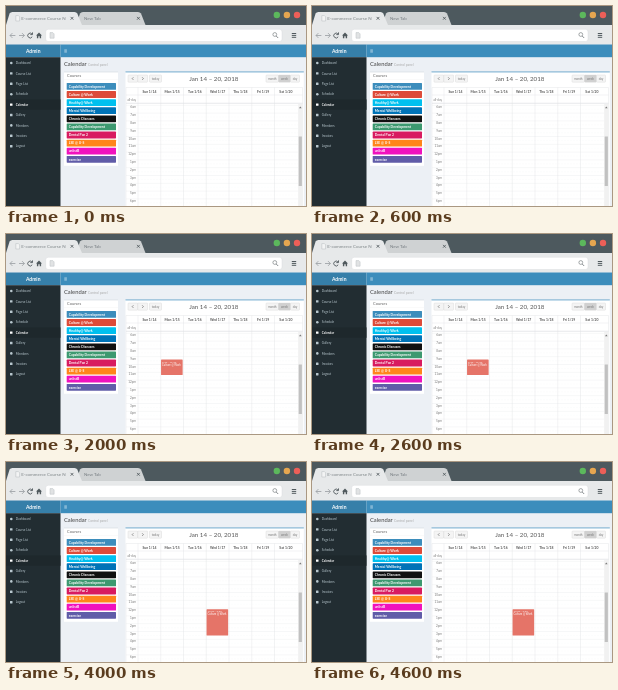
Animation, 300 px wide and 200 px high, one loop 5000 ms. Source, as an HTML page:

```html
<!DOCTYPE html>
<html lang="en">
<head>
<meta charset="utf-8">
<title>Course calendar</title>
<style>
html, body { margin: 0; width: 100%; height: 100%; overflow: hidden; background: #ecf0f5; }
svg { display: block; width: 100vw; height: 100vh; font-family: Lato, "Open Sans", sans-serif; }
</style>
</head>
<body>
<svg id="stage" viewBox="0 0 300 200"></svg>
<script>
const NS = 'http://www.w3.org/2000/svg';
const stage = document.getElementById('stage');

function add(parent, tag, attrs) {
  const node = document.createElementNS(NS, tag);
  for (const key in attrs) node.setAttribute(key, attrs[key]);
  parent.appendChild(node);
  return node;
}
const group = () => add(stage, 'g', {});
const rect = (g, x, y, width, height, fill, more) =>
  add(g, 'rect', { x, y, width, height, fill, ...more });
const path = (g, d, stroke, width = 0.6, fill = 'none') =>
  add(g, 'path', { d, stroke, 'stroke-width': width, fill });
const circle = (g, cx, cy, r, fill, more) => add(g, 'circle', { cx, cy, r, fill, ...more });
function text(g, str, x, y, size, fill, more) {
  add(g, 'text', { x, y, 'font-size': size, fill, ...more }).textContent = str;
}
const bold = { 'font-weight': 700 };
const mid = { 'text-anchor': 'middle' };
const end = { 'text-anchor': 'end' };

function drawBrowser(g) {
  rect(g, 0, 0, 300, 20, '#4d595e');
  path(g, 'M70 19L74 7.5Q74.7 6 77 6H132Q134 6 135 7.5L139.5 19Z', 'none', 0, '#cfd2d3');
  path(g, 'M0 19L3.6 7.5Q4.3 6 6.5 6H68.5Q70.5 6 71.3 7.5L76 19Z', 'none', 0, '#e7e9ea');
  path(g, 'M9.8 9.6h2.6l1.2 1.2v4.2H9.8Z', '#b5babc', 0.5, '#f3f4f4');
  text(g, 'E-commerce Course N', 15.2, 14, 4.5, '#7d8487');
  path(g, 'M64.6 10.9l2.8 2.8m0 -2.8l-2.8 2.8M131 10.9l2.8 2.8m0 -2.8l-2.8 2.8', '#4a5256', 0.8);
  text(g, 'New Tab', 78, 14, 4.4, '#757c80');
  ['#5cb85c', '#e6a650', '#ec5f58'].forEach((c, i) => circle(g, 270.8 + i * 10.1, 9, 3.2, c));

  rect(g, 0, 19, 300, 19.5, '#e7e9ea');
  path(g, 'M9.4 29.5H4m2.4 -2.4L4 29.5l2.4 2.4M13 29.5h5.4m-2.4 -2.4l2.4 2.4l-2.4 2.4', '#989ea1', 0.8);
  path(g, 'M26 28A2.4 2.4 0 1 0 26.2 30.8M26.5 26.4v2.2h-2.2', '#50595d', 0.9);
  path(g, 'M30 29.6L33 26.6L36 29.6H35.1V32.2H33.7V30.3H32.3V32.2H30.9V29.6Z', 'none', 0, '#50595d');
  rect(g, 39.7, 23.3, 236.3, 12.2, '#fff', { rx: 2.5, stroke: '#d3d6d8', 'stroke-width': 0.4 });
  path(g, 'M44 26.6h2.8l1.3 1.3v4.3H44Z', '#b9bec0', 0.5, '#e1e3e4');
  circle(g, 268.8, 28.5, 1.9, 'none', { stroke: '#7b8285', 'stroke-width': 0.7 });
  path(g, 'M270.2 30l2 2', '#7b8285', 0.9);
  path(g, 'M285.8 27.5h4.4m-4.4 1.9h4.4m-4.4 1.9h4.4', '#50595d', 1);
}

function drawSidebar(g) {
  rect(g, 0, 38.5, 54.5, 12.7, '#367fa9');
  rect(g, 54.5, 38.5, 245.5, 12.7, '#3c8dbc');
  text(g, 'Admin', 27.2, 46.8, 5, '#fff', { ...bold, ...mid });
  path(g, 'M58.3 43.9h2.6m-2.6 1.1h2.6m-2.6 1.1h2.6', '#e8f1f7', 0.5);
  rect(g, 0, 51.2, 54.5, 149, '#222d32');
  const items = ['Dashboard', 'Course List', 'Page List', 'Schedule', 'Calendar',
    'Gallery', 'Members', 'Invoices', 'Logout'];
  items.forEach((label, i) => {
    const y = 57 + i * 10.4, on = i === 4, ink = on ? '#fff' : '#b8c7ce';
    if (on) rect(g, 0, y - 5.2, 54.5, 10.4, '#1e282c');
    if (i % 3 === 0) circle(g, 5.3, y, 1.3, ink);
    else rect(g, 4, y - 1.2, 2.5, 2.4, ink, { rx: 0.3 });
    text(g, label, 9.8, y + 1.1, 3.1, ink, on ? bold : {});
  });
}

const courses = [
  ['Capability Development', '#3c8dbc'], ['Culture @ Work', '#dd4b39'],
  ['Healthy@ Work', '#00c0ef'], ['Mental Wellbeing', '#0073b7'],
  ['Chronic Diseases', '#111'], ['Capability Development', '#3d9970'],
  ['Dental Pan 2', '#d81b60'], ['LSE @ U-S', '#ff851b'],
  ['unlistB', '#f012be'], ['exercise', '#605ca8']
];
let dragged;

function drawCourses(g) {
  text(g, 'Calendar', 58, 60.2, 5.8, '#444');
  text(g, 'Control panel', 82, 60, 3.3, '#aaa');
  rect(g, 58, 66, 54, 93.8, '#fff');
  rect(g, 58, 65.7, 54, 0.6, '#d2d6de');
  text(g, 'Courses', 61, 71.3, 4, '#666');
  rect(g, 58, 73.6, 54, 0.3, '#eee');
  courses.forEach(([label, color], i) => {
    const y = 77 + i * 8.1, row = add(g, 'g', {});
    rect(row, 60.7, y, 49.3, 6.8, color, { rx: 0.6 });
    text(row, label, 62.7, y + 4.6, 3.4, '#fff', bold);
    if (i === 1) dragged = row;
  });
}

const days = ['Sun', 'Mon', 'Tue', 'Wed', 'Thu', 'Fri', 'Sat'];
const left = 132, colW = 22.75, gridTop = 99.3, hourH = 7.8;
const colX = d => left + d * colW;

function button(g, x, w, label, fill = '#f4f4f4') {
  rect(g, x, 69, w, 7.2, fill, { rx: 0.7, stroke: '#d5d5d5', 'stroke-width': 0.4 });
  text(g, label, x + w / 2, 73.7, 3, '#777', mid);
}

function drawCalendar(g) {
  rect(g, 119.5, 66, 178.3, 134, '#fff');
  rect(g, 119.5, 65.6, 178.3, 0.7, '#3c8dbc');
  button(g, 122, 9.8, '');
  button(g, 131.8, 9.8, '');
  path(g, 'M127.4 71.3l-1.2 1.3l1.2 1.3M136.2 71.3l1.2 1.3l-1.2 1.3', '#555', 0.6);
  button(g, 143.5, 12, 'today');
  text(g, 'Jan 14 – 20, 2018', 207.8, 75, 6.2, '#555', mid);
  button(g, 260, 12.5, 'month');
  button(g, 272.5, 12, 'week', '#d0d0d0');
  button(g, 284.5, 9, 'day');

  const edge = '#dfe1e4';
  path(g, 'M120 81.5H296.5M120 89H296.5M120 97H296.5', edge, 0.4);
  rect(g, 120, 97, 176.5, 0.9, '#eceef0');
  text(g, 'all-day', 130, 94.8, 3, '#777', end);
  days.forEach((day, i) => {
    text(g, `${day} 1/${14 + i}`, colX(i) + colW / 2, 86.6, 3.4, '#555', { ...bold, ...mid });
  });
  for (let h = 6; h < 19; h++) {
    const y = gridTop + (h - 6) * hourH;
    path(g, `M120 ${y}H292`, '#e6e8ea', 0.35);
    add(g, 'path', { d: `M${left} ${y + hourH / 2}H292`, stroke: '#e6e8ea',
      'stroke-width': 0.25, 'stroke-dasharray': '0.5 1' });
    text(g, (h % 12 || 12) + (h < 12 ? 'am' : 'pm'), 130, y + 3.1, 3, '#777', end);
  }
  for (let d = 0; d < 7; d++) path(g, `M${colX(d)} 81.5V200`, edge, 0.4);
  path(g, 'M120 200V81.5M296.5 81.5V200', edge, 0.4);
  rect(g, 292.2, 98, 4.2, 102, '#f1f1f1');
  rect(g, 292.7, 130.5, 3.2, 49.5, '#c1c1c1');
  path(g, 'M293 102.2l1.3 -1.6l1.3 1.6Z', 'none', 0, '#777');
}

function drawPrompt() {
  const g = group();
  rect(g, colX(1), gridTop + 4 * hourH, colW, 2 * hourH, '#e8eaec');
  rect(g, 147.2, 124.2, 49.3, 6.8, '#c83c2f', { rx: 0.6 });
  text(g, 'Culture @ Work', 149.2, 128.8, 3.4, '#fff', bold);
  rect(g, 156.4, 38.4, 108, 26, '#000', { opacity: 0.1, rx: 0.8 });
  rect(g, 157, 38.2, 106.6, 25.6, '#fff', { stroke: '#c3c7ca', 'stroke-width': 0.4 });
  rect(g, 160.6, 40.7, 98.6, 6.2, '#fff', { stroke: '#92bdf3', 'stroke-width': 0.6 });
  rect(g, 161.6, 42, 3.8, 3.5, '#8ab6f5');
  rect(g, 224.8, 53.5, 15.8, 7, '#4285f4', { rx: 0.7 });
  text(g, 'OK', 232.7, 58.1, 3, '#fff', { ...bold, ...mid });
  rect(g, 243.6, 53.5, 15.5, 7, '#fafafa', { rx: 0.7, stroke: '#dcdfe1', 'stroke-width': 0.4 });
  text(g, 'Cancel', 251.3, 58.1, 3, '#999', mid);
  return g;
}

function drawEvent(day, y, height, hours) {
  const g = group(), x = colX(day) + 0.3;
  rect(g, x, y, 21.6, height, '#e57468', { rx: 0.5 });
  text(g, hours, x + 1, y + 3, 2.6, '#fff');
  text(g, 'Culture @ Work', x + 1, y + 6.2, 2.7, '#fff');
  return g;
}

const base = group();
rect(base, 0, 0, 300, 200, '#ecf0f5');
drawBrowser(base);
drawSidebar(base);
drawCourses(base);
drawCalendar(base);

const steps = [
  null,
  drawPrompt(),
  drawEvent(1, 125.6, 15.4, '9:30 - 11:30'),
  drawEvent(1, 125.8, 26.4, '9:30 - 1:00'),
  drawEvent(3, 147.2, 26.2, '12:00 - 3:30')
];
const stepMs = 1000;
const start = performance.now();

function show(now) {
  const current = Math.floor(Math.max(0, now - start) / stepMs) % steps.length;
  steps.forEach((g, i) => g && g.setAttribute('visibility', i === current ? 'visible' : 'hidden'));
  dragged.setAttribute('visibility', current === 1 ? 'hidden' : 'visible');
  requestAnimationFrame(show);
}
show(start);
</script>
</body>
</html>
```
